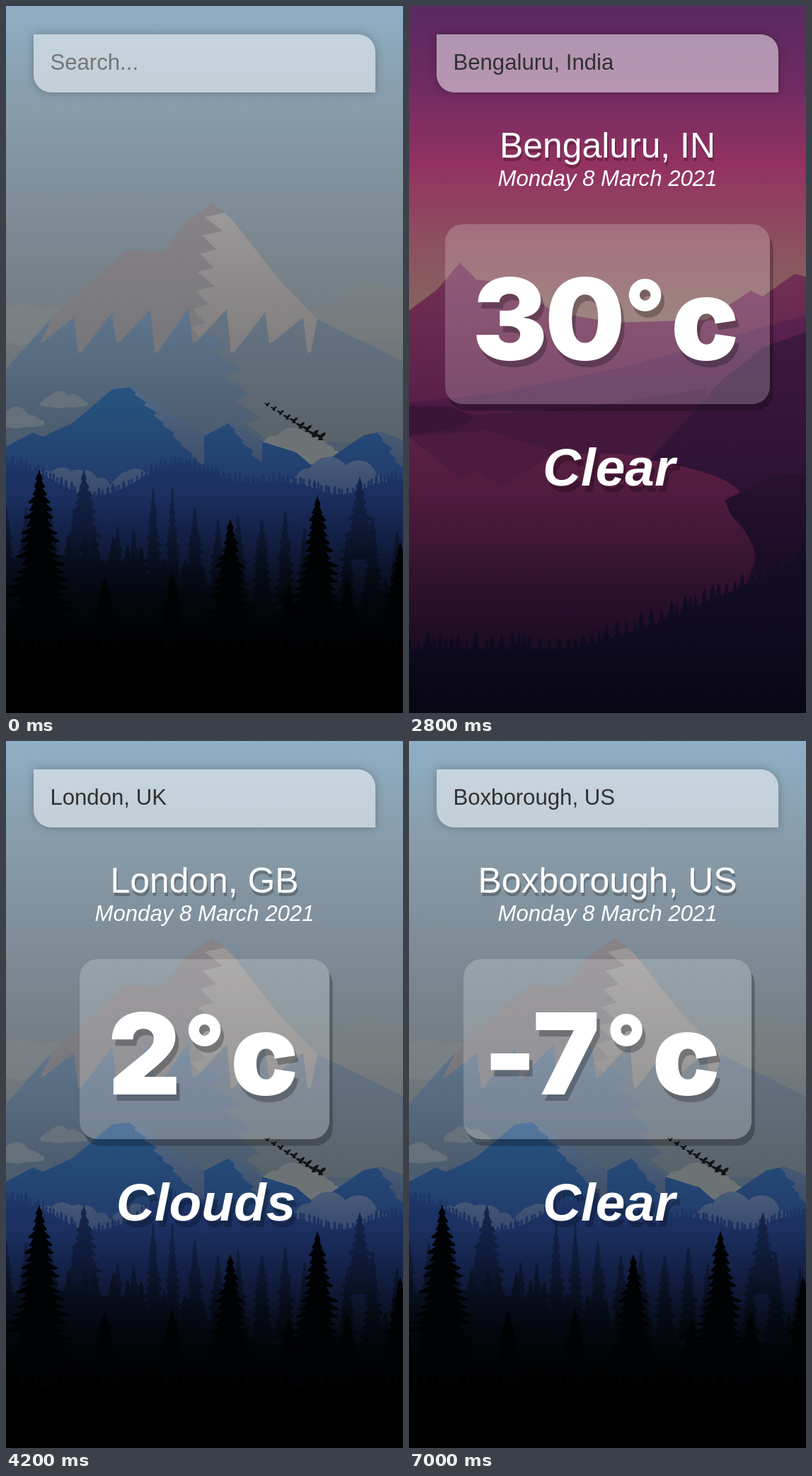
These frames come from a looping animation (561 px wide and 998 px high, 8.4 s). An HTML page with a canvas:

```html
<!DOCTYPE html>
<html lang="en">
<head>
<meta charset="utf-8">
<title>Weather</title>
<style>
html, body { margin: 0; width: 100%; height: 100%; overflow: hidden; background: #000; }
#stage { position: relative; width: 561px; height: 998px; overflow: hidden;
  font-family: "Liberation Sans", Arial, sans-serif; color: #fff; }
#stage > * { position: absolute; }
canvas { left: 0; top: 0; }
#search { left: 39px; top: 39.5px; width: 483px; height: 82.3px; box-sizing: border-box;
  padding: 40.5px 23.4px 0; border-radius: 0 25px; background: rgba(255,255,255,.5);
  box-shadow: 0 0 12.5px rgba(0,0,0,.25); font-size: 31.17px; line-height: 0; color: #313131; }
#search.empty { color: #757575; }
.line { left: 0; width: 561px; text-align: center; line-height: 0; white-space: nowrap; }
#place { top: 196.7px; font-size: 49.87px; text-shadow: 1.6px 4.7px rgba(0,0,0,.25); }
#date { top: 244.3px; font-size: 31.17px; font-style: italic; }
#temp { left: 0; right: 0; top: 307.8px; width: fit-content; height: 254.4px; margin: auto;
  box-sizing: border-box; padding: 133.4px 39px 0; display: flex; border-radius: 25px;
  background: rgba(255,255,255,.2); box-shadow: 4.7px 9.4px rgba(0,0,0,.25);
  font: 900 158.95px/0 Inter, sans-serif; text-shadow: 4.7px 9.4px rgba(0,0,0,.25); }
#temp span { display: flex; justify-content: center; width: .667em; }
#temp .minus { width: .333em; }
#temp .degree { position: relative; top: -10.5px; width: .506em; font-size: .79em; }
#sky { left: 2px; top: 650.8px; font-size: 74.8px; font-weight: 700; font-style: italic;
  text-shadow: 4.7px 9.4px rgba(0,0,0,.25); }
</style>
</head>
<body>
<div id="stage">
  <canvas id="cold" width="561" height="998"></canvas>
  <canvas id="warm" width="561" height="998"></canvas>
  <div id="search"></div>
  <div id="place" class="line"></div>
  <div id="date" class="line">Monday 8 March 2021</div>
  <div id="temp"></div>
  <div id="sky" class="line"></div>
</div>
<script>
const W = 561, H = 998, HOLD = 1400;
const el = id => document.getElementById(id);
let ctx, seed = 7;
const random = () => (seed = seed * 16807 % 2147483647) / 2147483647;
const between = (low, high) => low + (high - low) * random();

// Vertical gradient through evenly spaced colours.
function fade(top, bottom, ...colours) {
  const gradient = ctx.createLinearGradient(0, top, 0, bottom);
  colours.forEach((colour, i) => gradient.addColorStop(i / (colours.length - 1), colour));
  return gradient;
}

const polygon = points => new Path2D("M" + points.join("L") + "Z");
const land = ridge => polygon([[0, H], ...ridge, [W, H]]);

function fill(path, colour) {
  ctx.fillStyle = colour;
  ctx.fill(typeof path === "string" ? new Path2D(path) : path);
}

// Saw-toothed edge running down a slope.
function saw(x0, y0, x1, y1, teeth, depth) {
  const points = [];
  for (let i = 0; i <= teeth; i++) {
    const x = x0 + (x1 - x0) * i / teeth, y = y0 + (y1 - y0) * i / teeth;
    points.push([x, y], [x + depth * between(.7, 1.2), y + (y1 - y0) / teeth * .75]);
  }
  return points;
}

// Paints the part of an area from a toothed edge to the given right side.
function sunlit(area, edge, right, colour) {
  ctx.save();
  ctx.clip(area);
  fill(polygon([...edge, [right, edge.at(-1)[1]], [right, edge[0][1]]]), colour);
  ctx.restore();
}

function cloud(x, y, width, colour) {
  const path = new Path2D();
  for (let t = 0; t <= 1; t += .1) {
    const r = width * (.06 + .14 * Math.sin(Math.PI * t) * between(.5, 1.2));
    const cx = x + width * (t - .5), cy = y - r * .7;
    path.moveTo(cx + r, cy);
    path.arc(cx, cy, r, 0, 7);
  }
  fill(path, colour);
}

function conifer(x, top, half, height, colour) {
  const levels = Math.max(4, Math.round(height / 11)), step = height / levels;
  for (const side of [-1, 1]) {
    const points = [[x - side, top], [x + side * 2, top + step * .5]];
    for (let i = 1; i <= levels; i++) {
      const y = top + step * i, reach = side * half * (i / levels) ** .8 * between(.75, 1.15);
      points.push([x + reach * .8, y - step * .15], [x + reach, y + step * .1],
        [x + reach * .85, y + step * .3], [x + reach * .55, y + step * .25]);
    }
    points.push([x - side, top + height]);
    fill(polygon(points), colour);
  }
}

// Land below the ridge y = ridge(x), planted with trees.
function woods(ridge, spacing, size, colour) {
  const line = [];
  for (let x = 0; x <= W; x += 11) line.push([x, ridge(x)]);
  fill(land(line), colour);
  for (let x = 0; x < W; x += spacing * between(.6, 1.4)) {
    const height = size * between(.6, 1.3);
    conifer(x, ridge(x) - height * .55, height * .3, height * 1.2, colour);
  }
}

function bird(x, y, scale) {
  ctx.save();
  ctx.translate(x, y);
  ctx.scale(scale, scale);
  fill("M-8-3Q-3-4 0-1Q3-5 8-5Q7 0 3 2L4 6L-3 6L-2 2Q-6 1-8-3Z", "#111314");
  ctx.restore();
}

function paintCold() {
  ctx = el("cold").getContext("2d");
  fill(land([[0, 0], [W, 0]]), fade(0, 560, "#8fafc6", "#889caa", "#7e8d98", "#747e84", "#696f72"));
  cloud(35, 470, 150, "rgba(135,138,138,.3)");
  cloud(520, 460, 200, "rgba(126,126,123,.3)");

  const ridge = [[0, 512], [65, 440], [170, 345], [222, 347], [255, 303], [293, 278], [320, 302],
    [385, 385], [440, 442], [W, 502]];
  const peak = land(ridge);
  fill(peak, fade(400, 600, "#627a92", "#586b80", "#4d5d70"));
  sunlit(peak, saw(262, 420, 340, 590, 5, 34), W, fade(430, 620, "#657484", "#596268"));

  const fangs = [];
  for (let i = 7; i >= 0; i--) {
    const x = 50 + 54 * i;
    fangs.push([x + 3, 474 + 14 * (i % 2)], [x - 2, 476 + 14 * (i % 2)]);
    if (i) fangs.push([x - 8, 448 - 22 * Math.sin(Math.PI * i / 8)]);
  }
  const snow = polygon([...ridge.slice(1, -1), ...fangs]);
  fill(snow, fade(280, 490, "#878387", "#76767b"));
  sunlit(snow, saw(284, 272, 258, 480, 8, 22), W, fade(280, 470, "#9d9b9a", "#817f7f"));

  cloud(82, 564, 60, "#65727b");
  cloud(15, 592, 70, "#65717a");
  cloud(405, 640, 120, "#6d7375");

  const foothills = land([[0, 622], [38, 602], [52, 608], [95, 588], [150, 541], [178, 538],
    [280, 607], [318, 587], [362, 615], [410, 630], [437, 653], [505, 606], [530, 601], [W, 613]]);
  const face = fade(540, 640, "#526b87", "#40506b");
  fill(foothills, fade(540, 680, "#285480", "#203b6b"));
  sunlit(foothills, saw(168, 534, 262, 636, 7, 16), 280, face);
  sunlit(foothills, saw(311, 586, 346, 633, 3, 14), 362, face);
  sunlit(foothills, saw(522, 600, 550, 643, 3, 14), W, face);

  const mist = fade(630, 710, "#4b5e7a", "#30436a");
  for (const [x, width] of [[90, 110], [205, 110], [470, 140]]) cloud(x, 686, width, mist);

  woods(x => 668 - 24 * Math.cos(x / 40) * Math.exp(-(((x - 140) / 200) ** 4))
    + 22 * Math.exp(-(((x - 470) / 50) ** 2)), 6, 20,
    fade(620, 900, "#20396e", "#1b2f60", "#111d40", "#070c18", "#000"));

  const dusk = fade(650, 890, "#162850", "#0e1a38", "#050912", "#000");
  for (let x = 0; x < W; x += between(22, 36)) conifer(x, between(705, 750), 20, 130, dusk);
  for (const [x, top, half] of [[110, 655, 30], [208, 680, 14], [235, 680, 12], [500, 665, 28]])
    conifer(x, top, half, 115, dusk);
  woods(x => 815 - 40 * Math.cos((x - 60) / 118), 20, 55, fade(750, 910, "#0a1326", "#04070e", "#000"));

  for (const [x, top] of [[47, 655], [140, 805], [235, 802], [317, 725], [400, 815], [440, 692],
    [482, 808], [557, 757]]) {
    const height = 930 - top;
    conifer(x, top, 8 + height * .2, height, "#010204");
  }
  woods(() => 914, 12, 34, "#000");

  for (let t = 0; t <= 1; t += .125)
    bird(369 + 75 * t, 562 + 46 * t + 7 * Math.sin(t * 25), .5 + .5 * t);
}

function paintWarm() {
  ctx = el("warm").getContext("2d");
  fill(land([[0, 0], [W, 0]]), fade(0, 450, "#592960", "#6f2b62", "#933260", "#8d5060", "#84675f"));
  fill(land([[0, 430], [40, 400], [72, 362], [95, 386], [150, 393], [205, 432], [290, 447],
    [420, 443], [483, 402], [500, 410], [545, 378], [W, 382]]),
    fade(365, 560, "#743055", "#5a1f48"));
  fill(land([[0, 560], [130, 545], [300, 510], [400, 483], [W, 436]]), fade(440, 560, "#5a2250", "#4b1b45"));

  // Lake, then its shores and reflections.
  fill(land([[0, 604], [W, 604]]), fade(604, 930, "#5d2143", "#511c3f", "#3c1633", "#270f28", "#160b1f"));
  fill("M0 565H55L90 578L250 566L420 540V645L300 632H200L75 605L0 608Z", "#42183c");
  fill("M0 565H55L92 580L75 595L0 606Z", "#3b1538");
  fill("M0 608L110 599L210 630L130 679L96 656L74 669Z", "#4c1b3e");
  fill("M340 641L440 530L500 482L561 460V850L465 835Q505 770 480 735L447 700L470 690Q455 660 340 641Z",
    fade(470, 840, "#3d183f", "#351439", "#2a1132", "#1a0c25"));
  fill("M446 698L515 662L561 660V830L488 800Q498 760 456 720Z", fade(655, 820, "#28112f", "#180c24"));
  woods(x => 908 - 132 * Math.max(0, (x - 220) / 341) ** 1.3, 11, 36,
    fade(760, 998, "#150d25", "#100b20", "#080714"));
}

paintCold();
paintWarm();

const scenes = [
  { query: "" },
  { query: "Bengaluru, India" },
  { query: "Bengaluru, India", place: "Bengaluru, IN", temp: "30°c", sky: "Clear", warm: true },
  { query: "London, UK", place: "London, GB", temp: "2°c", sky: "Clouds" },
  { query: "Mumbai, India", place: "Mumbai, IN", temp: "33°c", sky: "Smoke", warm: true },
  { query: "Boxborough, US", place: "Boxborough, US", temp: "-7°c", sky: "Clear" }
];
const glyphClass = { "-": "minus", "°": "degree" };
let shown;

function show(scene) {
  el("search").textContent = scene.query || "Search...";
  el("search").className = scene.query ? "" : "empty";
  el("warm").hidden = !scene.warm;
  for (const id of ["place", "date", "temp", "sky"])
    el(id).style.visibility = scene.place ? "visible" : "hidden";
  el("place").textContent = scene.place || "";
  el("sky").textContent = scene.sky || "";
  el("temp").innerHTML = [...scene.temp || ""].map(c =>
    `<span class="${glyphClass[c] || ""}">${c}</span>`).join("");
}

function tick() {
  const scene = scenes[Math.floor(performance.now() / HOLD) % scenes.length];
  if (scene !== shown) show(shown = scene);
  requestAnimationFrame(tick);
}
tick();
</script>
</body>
</html>
```
